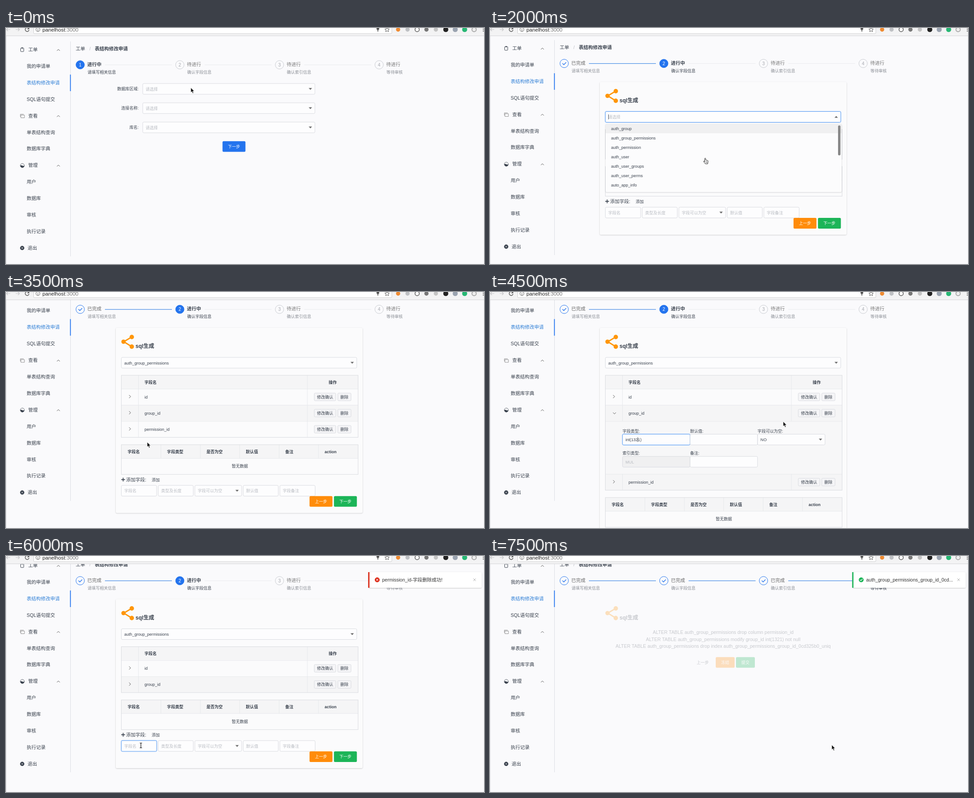
Write an HTML page that moves like this. It is 1063 px wide and 527 px high and loops after 8 s.

```html
<!DOCTYPE html>
<html lang="zh-CN">
<head>
<meta charset="utf-8">
<style>
  html, body { margin: 0; width: 100%; height: 100%; overflow: hidden; background: #fafafc; }
  svg { display: block; width: 100%; height: 100%; }
  text { font-family: "Liberation Sans", "Noto Sans CJK SC", "Noto Sans CJK", sans-serif; white-space: pre; }
</style>
</head>
<body>
<svg id="stage" viewBox="0 0 1063 527" xmlns="http://www.w3.org/2000/svg">
  <defs>
    <filter id="shadow" x="-5%" y="-20%" width="110%" height="150%">
      <feDropShadow dx="0" dy=".8" stdDeviation="1.3" flood-opacity=".24"/>
    </filter>
    <clipPath id="view"><rect y="18" width="1063" height="509"/></clipPath>
  </defs>
  <rect width="1063" height="527" fill="#fafafc"/>
  <g id="page" clip-path="url(#view)"></g>
  <g id="chrome"></g>
  <g id="overlay"></g>
</svg>
<script>
const INK = '#39414d', GREY = '#8b8f96', PALE = '#b9bcc2', LINE = '#d9dbe0', STRIPE = '#f5f5f6';
const BLUE = '#2474ee', LINK = '#2f7fd6', ORANGE = '#ff8c0a', GREEN = '#1cb558', RED = '#dc2410';
const $ = id => document.getElementById(id);

// Drawing helpers; text is placed by its vertical centre.
const text = (x, y, s, size = 9.05, fill = INK, extra = '') =>
  `<text x="${x}" y="${y + size * .36}" font-size="${size}" fill="${fill}" ${extra}>${s}</text>`;
const bold = (x, y, s, size = 9.05, extra = '') => text(x, y, s, size, INK, 'font-weight="700" ' + extra);
const mid = (x, y, s, size, fill) => text(x, y, s, size, fill, 'text-anchor="middle"');
const rect = (x, y, w, h, fill, extra = '') =>
  `<rect x="${x}" y="${y}" width="${w}" height="${h}" fill="${fill}" ${extra}/>`;
const path = (d, stroke = INK, width = 1, fill = 'none') =>
  `<path d="${d}" stroke="${stroke}" stroke-width="${width}" fill="${fill}" stroke-linecap="round" stroke-linejoin="round"/>`;
const circle = (x, y, r, fill, extra = '') => `<circle cx="${x}" cy="${y}" r="${r}" fill="${fill}" ${extra}/>`;
const group = (body, attrs) => `<g ${attrs}>${body}</g>`;
const button = (x, y, w, label, fill) =>
  rect(x, y, w, 23.8, fill, 'rx="2.500"') + mid(x + w / 2, y + 12, label, 9, '#fff');
const caret = (x, y, up) => {
  const k = up ? -1 : 1;
  return path(`M${x - 3.2} ${y - 1.8 * k}h6.4l-3.2 ${3.6 * k}z`, '#666', .4, '#666');
};

function field(x, y, w, label, o = {}) {
  const edge = o.focus ? '#5b9df2' : LINE;
  const glow = o.focus ? rect(x - .8, y - .8, w + 1.6, 25.6, 'none', 'rx="3.500" stroke="#cfe2fb" stroke-width="1.200"') : '';
  return glow + rect(x, y, w, 24, o.off ? '#f0f0f1' : '#fdfdfe', `rx="2.500" stroke="${edge}"`) +
    text(x + 6.5, y + 12.3, label, 9.05, o.filled ? INK : PALE) +
    (o.caret ? caret(x + w - 10, y + 12, o.caret === 'up') : '');
}

function sidebar() {
  const items = ['>工单', '我的申请单', '表结构修改申请', 'SQL语句提交', '>查看', '单表结构查询', '数据库字典',
    '>管理', '用户', '数据库', '审核', '执行记录', '退出'];
  let s = rect(143, 30, 1, 480, '#dcdee3') + rect(142.4, 104, 1.8, 37, BLUE);
  items.forEach((name, i) => {
    const y = 48.3 + i * 36.9, head = name[0] === '>';
    const x = head ? 49.5 : i === 12 ? 48 : 46;
    s += text(x, y, name.replace('>', ''), 10.5, i === 2 ? LINK : INK);
    if (head) s += path(`M113.5 ${y + 2.3}l3-3 3 3`, '#555');
  });
  return s + rect(32.5, 44.7, 7, 8, 'none', `rx="1" stroke="${INK}"`) + rect(34.3, 43.5, 3.4, 2.2, INK) +
    path('M32 198v-5.500h7M33.500 194.500h7.500v6h-7.500z', '#777', .8) +
    circle(36.3, 307, 4.4, '#fff', `stroke="${INK}" stroke-width=".8"`) +
    path('M32 307.500q2-1.500 4.300 0t4.300 0a4.300 4.300 0 0 1-8.600 0', INK, .5, INK) +
    circle(36, 491.2, 4.7, INK) + path('M34.500 489.700l3 3m0-3l-3 3', '#fff', .8);
}

function steps(current) {
  const notes = ['请填写相关信息', '确认字段信息', '确认索引信息', '等待审核'];
  let s = text(155, 46.5, '工单', 10.5) + text(185.5, 46.5, '/', 10, PALE) + bold(197.5, 46.5, '表结构修改申请', 10.5);
  notes.forEach((note, i) => {
    const x = 155 + i * 221.6, n = i + 1, done = n < current, now = n === current;
    s += circle(x + 10, 82.2, 9.4, now ? BLUE : 'none', `stroke="${done || now ? BLUE : '#c9ccd1'}"`);
    s += done ? path(`M${x + 6.5} 82.300l2.700 2.700 4.800-5`, BLUE, 1.4)
      : mid(x + 10, 82.2, n, 10, now ? '#fff' : '#a5a8ae');
    const title = done ? '已完成' : now ? '进行中' : '待进行';
    s += now ? bold(x + 25.7, 81, title, 10.5) : text(x + 25.7, 81, title, 10.5, done ? '#666' : '#777');
    s += text(x + 26.3, 98.7, note, 9.05, now ? INK : GREY);
    if (i < 3) s += rect(x + 65, 81.8, 149, done ? 1.2 : 1, done ? '#3f88e4' : '#e9eaee');
  });
  return s;
}

function menu(x, y, w, names, o) {
  let s = rect(x, y, w, names.length * 21.1 + 4, '#fcfcfd', 'rx="3" filter="url(#shadow)"');
  names.forEach((name, i) => {
    const row = y + 10 + i * 21.1;
    if (i === o.hover) s += rect(x, row - 10.5, w, 21, '#f0f0f1');
    s += text(x + 12.3, row, name);
  });
  if (o.thumb !== undefined) s += rect(x + w - 8, y + o.thumb, 5.4, 67, '#888', 'rx="2.700"');
  return s;
}

function firstForm({ values, open }) {
  let s = '';
  ['数据库区域:', '连接名称:', '库名:'].forEach((label, i) => {
    const y = 124 + i * 43;
    s += text(295, y + 11.5, label, 9.05, INK, 'text-anchor="end"') +
      field(304, y, 383, values[i] || '请选择', { filled: values[i], focus: open === i, caret: open === i ? 'up' : 'down' });
  });
  s += button(481.5, 252.8, 51, '下一步', BLUE);
  if (open === 1) s += menu(304, 195, 383, ['test'], { hover: 0 });
  if (open === 2) {
    const names = ['information_schema', 'harnet_deploy', 'relbs', 'performance_schema', 'tutorialSQL', 'sys', 'test_db'];
    s += group(menu(0, 0, 383, names, {}), 'transform="translate(304 241) scale(1 .845)" opacity=".24"');
  }
  return s;
}

const cardTitle = () => path('M279.500 144l-17.500 10.500 17.500 11', '#ff9608', 2.8) +
  circle(261.3, 154.5, 4.8, '#ff9608') + circle(279.7, 144, 4.9, '#ff9608') + circle(279.7, 165.5, 4.9, '#ff9608') +
  bold(288, 164.5, 'sql生成', 12.1);

const vertical = (xs, y, h) => xs.map(x => rect(x, y, .8, h, '#e3e5e9')).join('');
const frame = (y, h) => rect(256.5, y, 526.5, h, 'none', `stroke="${LINE}"`);

function detail(y, type, focus) {
  const parts = [[0, 0, '字段类型:', type, { filled: 1, focus }], [1, 0, '默认值:', '', {}],
    [2, 0, '字段可以为空:', 'NO', { filled: 1, caret: 'down' }], [0, 1, '索引类型:', 'MUL', { off: 1 }], [1, 1, '备注:', '', {}]];
  return rect(256.5, y, 526.5, 118, '#f7f7f8') + rect(256.5, y, 526.5, .8, '#e3e5e9') +
    parts.map(([c, r, label, value, o]) => {
      const x = 294.7 + c * 150.2, top = y + 29 + r * 49.6;
      return text(x, top - 7, label) + field(x, top, 150, value, o);
    }).join('');
}

function rowTable(y, title, rows, edit) {
  const top = y;
  let s = rect(256.5, y, 526.5, 30.3, STRIPE) + bold(308, y + 15.5, title) + bold(726.5, y + 15.5, '操作', 9.05, 'text-anchor="middle"') +
    vertical([294.2, 669.7], y, 30.3);
  y += 30.3;
  let striped = false;
  rows.forEach((name, i) => {
    const open = edit && i === 1, c = y + 18;
    s += rect(256.5, y, 526.5, 36.1, striped ? STRIPE : '#fbfbfc') + rect(256.5, y, 526.5, .8, '#e3e5e9') +
      vertical([294.2, 669.7], y, 36.1) + text(308, c, name) +
      path(open ? `M273.800 ${c - 1}l3 3 3-3` : `M274 ${c - 4}l3.200 3.200-3.200 3.200`, '#555');
    [[685.5, 48, '修改确认'], [737.8, 29.5, '删除']].forEach(([x, w, label]) => {
      s += rect(x, c - 8.5, w, 17, '#f5f5f7', `rx="2" stroke="${LINE}"`) + mid(x + w / 2, c, label, 9.05, INK);
    });
    y += 36.1;
    // An open detail panel takes its own turn in the striping.
    if (open) { s += detail(y, edit.type, edit.focus); y += 118; }
    else striped = !striped;
  });
  if (!rows.length) { s += mid(520, y + 18, '暂无数据', 9.05, INK); y += 36.1; }
  return { svg: s + frame(top, y - top), end: y };
}

function emptyTable(y, heads) {
  const xs = heads.map((_, i) => 256.5 + i * 87.6);
  return rect(256.5, y, 526.5, 30.3, STRIPE) + heads.map((h, i) => bold(xs[i] + 14, y + 15.5, h)).join('') +
    vertical(xs.slice(1), y, 30.3) + rect(256.5, y + 30, 526.5, .8, '#e3e5e9') +
    mid(520, y + 48, '暂无数据', 9.05, INK) + frame(y, 66.3);
}

function addLine(y, kind, names, focus) {
  const boxes = [[256.5, 78.5], [338.5, 78], [420, 104], [527.5, 78], [609, 78.5]];
  return path(`M257 ${y + 11.5}h7m-3.500-3.500v7`, INK, 1.7) + text(267, y + 12, `添加${kind}:`, 10.5) + text(324, y + 12.5, '添加') +
    names.map((n, i) => field(boxes[i][0], y + 24.5, boxes[i][1], n, { focus: focus && !i, caret: i === 2 && 'down' })).join('') +
    button(675, y + 48.5, 51, '上一步', ORANGE) + button(729.3, y + 48.5, 51, '下一步', GREEN);
}

function card(s, body, bottom) {
  return rect(244, 123.5, 549, bottom - 123.5, '#fbfbfc', 'rx="3" filter="url(#shadow)"') + cardTitle() + body;
}

function fieldsCard(s) {
  const table = rowTable(229.5, '字段名', s.rows || [], s.edit), y = table.end + 16.4;
  let body = field(256.5, 189.5, 523.5, s.table || '请选择', { filled: s.table, focus: s.menu, caret: s.menu ? 'up' : 'down' }) +
    table.svg + emptyTable(y, ['字段名', '字段类型', '是否为空', '默认值', '备注', 'action']) +
    addLine(y + 66.3, '字段', ['字段名', '类型及长度', '字段可以为空', '默认值', '字段备注'], s.focusName);
  if (s.menu) body += rect(263, 196, .9, 11, INK) + menu(257, 217.5, 525, s.menu.names, s.menu);
  return card(s, body, y + 152.3);
}

function indexCard(s) {
  const table = rowTable(189.5, '索引名', s.rows), y = table.end + 16.4;
  return card(s, table.svg + emptyTable(y, ['索引名', '索引类型', '是否唯一', '字段名', '备注', 'action']) +
    addLine(y + 66.3, '索引', ['索引名', '字段名', '是否唯一', '类型', '备注']), y + 152.3);
}

function resultCard() {
  const alter = 'ALTER TABLE auth_group_permissions ';
  const lines = ['drop column permission_id', 'modify group_id int(1321) not null',
    'drop index auth_group_permissions_group_id_0cd325b0_uniq'];
  return group(cardTitle() + lines.map((l, i) => mid(518.5, 197 + i * 15.8, alter + l, 10.46, INK)).join('') +
    mid(473, 264.5, '上一步', 9, INK) + button(502, 252.7, 42, '冻结', ORANGE) + button(547, 252.7, 42, '提交', GREEN),
    'opacity=".26"');
}

function notice({ ok, label }) {
  const color = ok ? GREEN : RED;
  return rect(806, 36, 252, 35, '#fff', 'rx="3" filter="url(#shadow)"') + rect(805.5, 36, 2.8, 35, color) +
    circle(825.5, 53.2, 5.4, color) +
    path(ok ? 'M823 53.300l1.900 1.900 3.200-3.700' : 'M823.600 51.300l3.800 3.800m0-3.800l-3.800 3.800', '#fff', 1.2) +
    text(836.5, 53.2, label, 10.5, '#333') + path('M1039.500 50.500l5 5m0-5l-5 5', '#999', .8);
}

function cursor([kind, x, y]) {
  const shape = {
    arrow: path('M0 0v10.500l2.400-2.200 1.800 4.200 1.900-.8-1.800-4h3.200z', '#fff', .7, '#111'),
    hand: path('M2.500 6.500V1.200q1.200-1.400 2.200 0v3.500l4.400 1.200q1 .5.800 2l-.8 5.400H4L.600 9q-1.300-2 .4-2l1.500 1.300z', '#222', 1, '#fff') +
      path('M5.300 8v3m1.800-3v3', '#222', .7),
    beam: path('M-2-5.500q2 0 2 1.200 0-1.200 2-1.200M0-4.500v9M-2 5.500q2 0 2-1.200 0 1.200 2 1.200', '#111', 1.2)
  }[kind];
  return group(shape, `transform="translate(${x} ${y})"`);
}

function toolbar() {
  const dots = [[872, '#ef8b32'], [893, '#bfc1c4'], [935, '#777'], [956, '#c4c4c4'], [978, '#222'], [999, '#9aa3b0'], [1020, '#27b774']];
  return rect(0, 0, 1063, 17, '#f3f3f4') + rect(0, 17, 1063, 1, '#d5d5d7') + rect(0, 18, .8, 509, '#dfe0e3') +
    rect(61.5, -6, 796.5, 18.7, '#fff', 'rx="2" stroke="#cfcfd1"') +
    path('M9 3.500H1m3-3-3 3 3 3M22 3.500h8m-3-3 3 3-3 3', '#c7c7c9', 1.2) +
    path('M50.500 1a4.300 4.300 0 1 0 .6 3.800M51-1v3h-3', '#555', 1.4) +
    circle(71, 3.5, 4.4, 'none', 'stroke="#555"') + path('M71 3v3M71 1v.1', '#555', 1.1) +
    text(81, 3.5, 'panelhost<tspan fill="#777">:3000</tspan>', 11.7, '#222') +
    circle(827, 1.5, 3, '#555') + rect(826.2, 3, 1.7, 5, '#555') +
    path('M847.500-1.200l1.500 3.200 3.500.4-2.600 2.300.8 3.500-3.200-1.800-3.200 1.800.8-3.500-2.600-2.300 3.500-.4z', '#555', 1) +
    dots.map(([x, fill]) => circle(x, 3.5, x > 970 ? 5.6 : 4.7, fill)).join('') +
    circle(914.3, 3.5, 4.7, '#fff', 'stroke="#555" stroke-width="1.500"') +
    circle(1041, 3.5, 4.8, '#eee', 'stroke="#aaa" stroke-width="2"') +
    [0, 3.5, 7].map(y => circle(1061.5, y, 1.1, '#555')).join('');
}

const GROUP = 'auth_group_permissions', REGION = 'Velcan_Master';
const columns = ['id', 'group_id', 'permission_id'];
const indexes = ['PRIMARY', GROUP + '_group_id_0cd325b0_uniq', GROUP + '_permission_id_84c5'];
const listTop = { names: ['auth_group', GROUP, 'auth_permission', 'auth_user', 'auth_user_groups', 'auth_user_perms', 'auto_app_info'], thumb: 3, hover: 0 };
const listEnd = { names: ['auto_db_info', 'auto_hosts_info', 'auto_rev_address', 'tondra_admin_log', 'tondra_content_type',
  'tondra_migrations', 'tondra_session'], thumb: 82, hover: 3 };
const removed = { ok: false, label: 'permission_id-字段删除成功!' };
const dropped = { ok: true, label: GROUP + '_group_id_0cd...' };
const loaded = { step: 2, table: GROUP, rows: columns, scroll: 43.5 };
const trimmed = { ...loaded, rows: columns.slice(0, 2), notice: removed };

// One state per half second.
const scenes = [
  { step: 1, scroll: 0, values: [], cursor: ['arrow', 411, 133.5] },
  { step: 1, scroll: 0, values: [REGION], open: 1, cursor: ['hand', 391, 200] },
  { step: 1, scroll: 0, values: [REGION, 'test'], open: 2, cursor: ['hand', 391, 217] },
  { step: 2, scroll: 27, cursor: ['hand', 503, 262] },
  { step: 2, scroll: 3, menu: listTop, cursor: ['hand', 475, 290] },
  { step: 2, scroll: 118, menu: listEnd, cursor: ['hand', 475, 290] },
  { step: 2, scroll: 27, table: GROUP, busy: true, cursor: ['arrow', 345, 250] },
  { ...loaded, cursor: ['arrow', 314, 335.5] },
  { ...loaded, edit: { type: 'int(11)', focus: true }, cursor: ['beam', 331, 329] },
  { ...loaded, edit: { type: 'int(1321)', focus: true }, typing: true, cursor: ['arrow', 652, 289.5] },
  { ...trimmed, scroll: 5, cursor: ['arrow', 750, 344] },
  { ...trimmed, scroll: 5, cursor: ['arrow', 520, 400] },
  { ...trimmed, scroll: 27, focusName: true, cursor: ['beam', 300, 423] },
  { step: 3, scroll: 27, rows: indexes, cursor: ['hand', 752, 441] },
  { step: 3, scroll: 27, rows: indexes, cursor: ['hand', 748, 244] },
  { step: 4, scroll: 27, notice: dropped, cursor: ['arrow', 760, 422] }
];
const contents = [firstForm, fieldsCard, indexCard, resultCard];

function render(s) {
  $('page').innerHTML = group(sidebar() + steps(s.step) + contents[s.step - 1](s), `transform="translate(0 ${-s.scroll})"`);
  $('overlay').innerHTML = (s.typing ? rect(328.4, 324, .8, 11, INK) : '') +
    (s.busy ? rect(1, 18, 1062, 509, '#fff', 'opacity=".8"') + circle(532, 272, 9, '#2d8cf0', 'opacity=".7"') : '') +
    (s.notice ? notice(s.notice) : '') + cursor(s.cursor);
}

$('chrome').innerHTML = toolbar();
const start = performance.now();
let shown = -1;
function tick() {
  const index = Math.floor((performance.now() - start) % 8000 / 500);
  if (index !== shown) render(scenes[shown = index]);
  requestAnimationFrame(tick);
}
tick();
</script>
</body>
</html>
```
